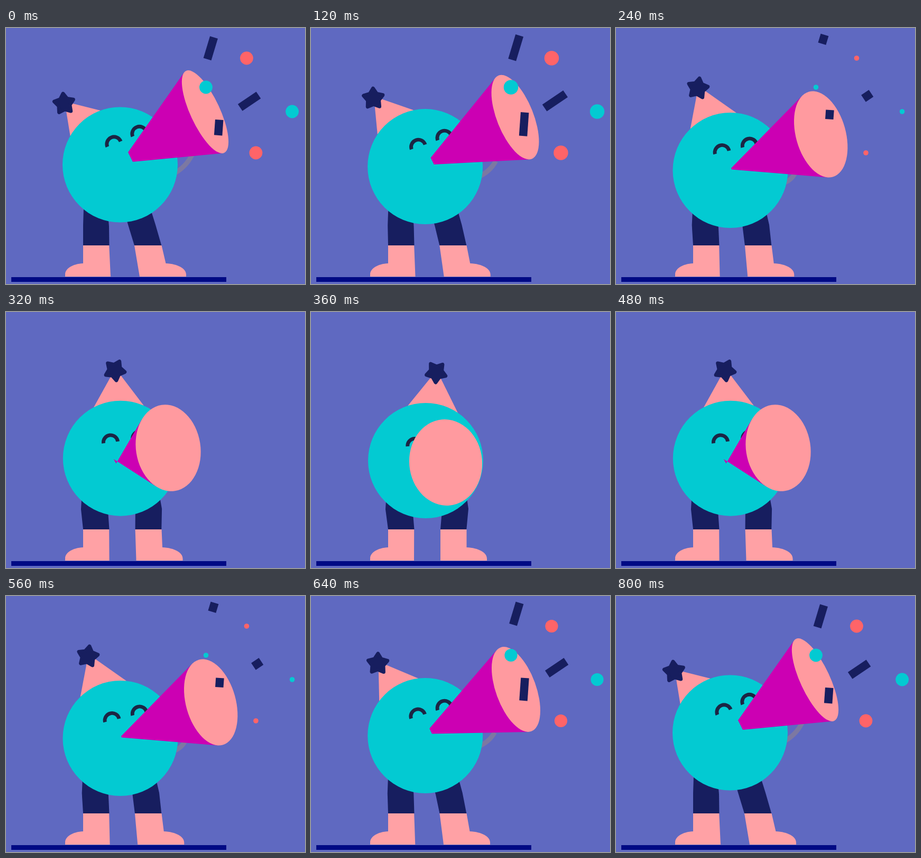
Recreate the animation shown at these times as an HTML page with a canvas. Size 566 by 484 pixels, loop 0.84 s.

```html
<!DOCTYPE html>
<html lang="en">
<head>
<meta charset="utf-8">
<title>Party megaphone</title>
<style>
  html, body { margin: 0; width: 100%; height: 100%; overflow: hidden; background: #5f69c1; }
  canvas { display: block; }
</style>
</head>
<body>
<canvas id="stage" width="566" height="484"></canvas>
<script>
const ctx = document.getElementById('stage').getContext('2d');
const LOOP = 840, STEP = 40, HALF = 400;
const NAVY = '#171e5f', PINK = '#ffa1a5', RIM = '#ff9a9f', TEAL = '#03cad2',
      CORAL = '#ff6468', MAGENTA = '#cc00b3', INK = '#1c2544', GREY = '#7c78a2';
const rad = deg => deg * Math.PI / 180;

// Smooth curve through five poses of the swing.
const TIMES = [0, .4, .6, .9, 1];
function pose(s, ...v) {
  const gap = i => TIMES[i + 1] - TIMES[i];
  const slope = i => (v[i + 1] - v[i]) / gap(i);
  const inner = i => (slope(i - 1) * gap(i) + slope(i) * gap(i - 1)) / (gap(i - 1) + gap(i));
  const tangent = i => i === 0 ? 1.5 * slope(0) - .5 * inner(1)
                     : i === 4 ? 1.5 * slope(3) - .5 * inner(3) : inner(i);
  const i = s < .4 ? 0 : s < .6 ? 1 : s < .9 ? 2 : 3;
  const h = gap(i), u = (s - TIMES[i]) / h, w = 1 - u;
  return w * w * (1 + 2 * u) * v[i] + u * u * (3 - 2 * u) * v[i + 1]
       + h * u * w * (w * tangent(i) - u * tangent(i + 1));
}

function polygon(color, points) {
  ctx.beginPath();
  points.forEach(p => ctx.lineTo(...p));
  ctx.closePath();
  ctx.fillStyle = color;
  ctx.fill();
}

function ellipse(color, x, y, rx, ry = rx, turn = 0) {
  ctx.beginPath();
  ctx.ellipse(x, y, rx, ry, turn, 0, 2 * Math.PI);
  ctx.fillStyle = color;
  ctx.fill();
}

function stroke(color, width) {
  ctx.strokeStyle = color;
  ctx.lineWidth = width;
  ctx.stroke();
}

function boot(topLeft, topRight, ankle, toe, heel) {
  ctx.beginPath();
  ctx.moveTo(topLeft, 411);
  ctx.lineTo(topRight, 411);
  ctx.lineTo(ankle, 445);
  ctx.bezierCurveTo(ankle + (toe - ankle) * .6, 446, toe, 455, toe, 466);
  ctx.lineTo(toe, 470);
  ctx.lineTo(heel, 470);
  ctx.fillStyle = PINK;
  ctx.fill();
}

function legs(e) {
  polygon(NAVY, [[146, 411], [146 - 5 * e, 373], [147 - 4 * e, 340],
                 [192, 340], [195 - 2.5 * e, 375], [195.5, 411]]);
  polygon(NAVY, [[243 + 2 * e, 411], [232 + 16 * e, 375], [224 + 20 * e, 348],
                 [275.5 + 19 * e, 348], [283 + 15 * e, 372], [294.3, 411]]);
  const lean = 1 - e;
  boot(195.2, 146, 146, 112, 195 + 3 * lean);
  boot(243 + 2 * e, 294.5, 294.5 + 8 * lean, 333 + 8 * lean, 245 + 8 * lean);
}

function hat(s, x, y) {
  const starX = pose(s, 110, 126.5, 155, 237, 270);
  const starY = pose(s, 143, 128, 114, 114, 122);
  const rim = deg => [x + 109 * Math.sin(rad(deg)), y - 109 * Math.cos(rad(deg))];
  polygon(RIM, [[starX + 1, starY - 4],
                rim(pose(s, -20, -7, 6, 34, 45)), rim(pose(s, -60, -53, -44, -18, -8))]);

  const turn = pose(s, -6, 1, 9, 39, 52);
  const points = Array.from({ length: 10 }, (_, i) => {
    const r = i % 2 ? 11 : 19, a = rad(turn + 36 * i);
    return [starX + r * Math.sin(a), starY - r * Math.cos(a)];
  });
  polygon(NAVY, points);
  ctx.lineJoin = 'round';
  stroke(NAVY, 7);
}

function handle(e) {
  const x0 = 352 - 8 * e - 42 * e * e, y0 = 240 + 73 * e;
  const x1 = 318 - 12 * e, y1 = 275 + 42 * e;
  ctx.beginPath();
  ctx.moveTo(x0, y0);
  ctx.quadraticCurveTo((x0 + x1) / 2 + 6, (y0 + y1) / 2 + 5, x1, y1);
  stroke(GREY, 9);
}

function eye(x, y, turn) {
  ctx.beginPath();
  ctx.arc(x, y, 13.7, Math.PI + turn, 2 * Math.PI + turn);
  stroke(INK, 6.8);
}

function megaphone(s, e) {
  const x = pose(s, 377, 388, 387.7, 255, 205);
  const y = pose(s, 158.5, 176.5, 201, 284.5, 305);
  const rx = 28 + 41 * e, ry = 85.5 - 4 * e, turn = rad(e * 20 - 25);
  const cos = Math.cos(turn), sin = Math.sin(turn);

  // Point where a line from (px, py) touches the rim.
  const touch = (px, py, side) => {
    const dx = px - x, dy = py - y;
    const u = (dx * cos + dy * sin) / rx, v = (dy * cos - dx * sin) / ry;
    const a = Math.atan2(v, u) + side * Math.acos(Math.min(1, 1 / Math.hypot(u, v)));
    const ex = rx * Math.cos(a), ey = ry * Math.sin(a);
    return [x + ex * cos - ey * sin, y + ex * sin + ey * cos];
  };
  const top = [231 - 28 * e, 235 + 64 * e], bottom = [240 - 45 * e, 253 + 31 * e];
  polygon(MAGENTA, [top, touch(...top, 1), touch(...bottom, -1), bottom]);
  ellipse(RIM, x, y, rx, ry, turn);
}

function confetti(s) {
  const tail = pose(s, 48, 43, 17.5, -33, -50);
  const lag = Math.max(0, 1 - s / .4);
  const strip = (x, y, deg, delay) => {
    const head = delay * lag, dx = Math.sin(rad(deg)), dy = -Math.cos(rad(deg));
    if (tail <= head) return;
    ctx.beginPath();
    ctx.moveTo(x - dx * head, y - dy * head);
    ctx.lineTo(x - dx * tail, y - dy * tail);
    stroke(NAVY, 15.5);
  };
  strip(395, 13, 16.8, 5);
  strip(483, 123.5, 56, 6);
  strip(405, 155, 4, 18.5);

  const r = pose(s, 12.4, 12.1, 4.8, -8, -12);
  if (r <= 0) return;
  ellipse(CORAL, 455.5, 57, r);
  ellipse(CORAL, 473, 236, r);
  ellipse(TEAL, 378.5, 112, r);
  ellipse(TEAL, 541.7, 158, r);
}

function draw(s) {
  const e = pose(s, 0, .244, .467, 1, 1.2);
  const x = 216 + e, y = 258.5 + 22.5 * e, tilt = rad(18 * e - 22);
  ctx.fillStyle = '#5f69c1';
  ctx.fillRect(0, 0, 566, 484);
  ctx.fillStyle = '#000a84';
  ctx.fillRect(10, 471, 407, 9);
  legs(e);
  hat(s, x, y);
  handle(e);
  ellipse(TEAL, x, y, 109);
  eye(x - 11.5 - 9 * e, y - 39 + 11 * e, tilt);
  eye(x + 36.5, y - 58.5 + 26 * e, tilt);
  megaphone(s, e);
  confetti(s);
}

function tick() {
  const t = Math.floor(performance.now() % LOOP / STEP) * STEP;
  draw(1 - Math.abs(t - HALF) / HALF);
  requestAnimationFrame(tick);
}
tick();
</script>
</body>
</html>
```
